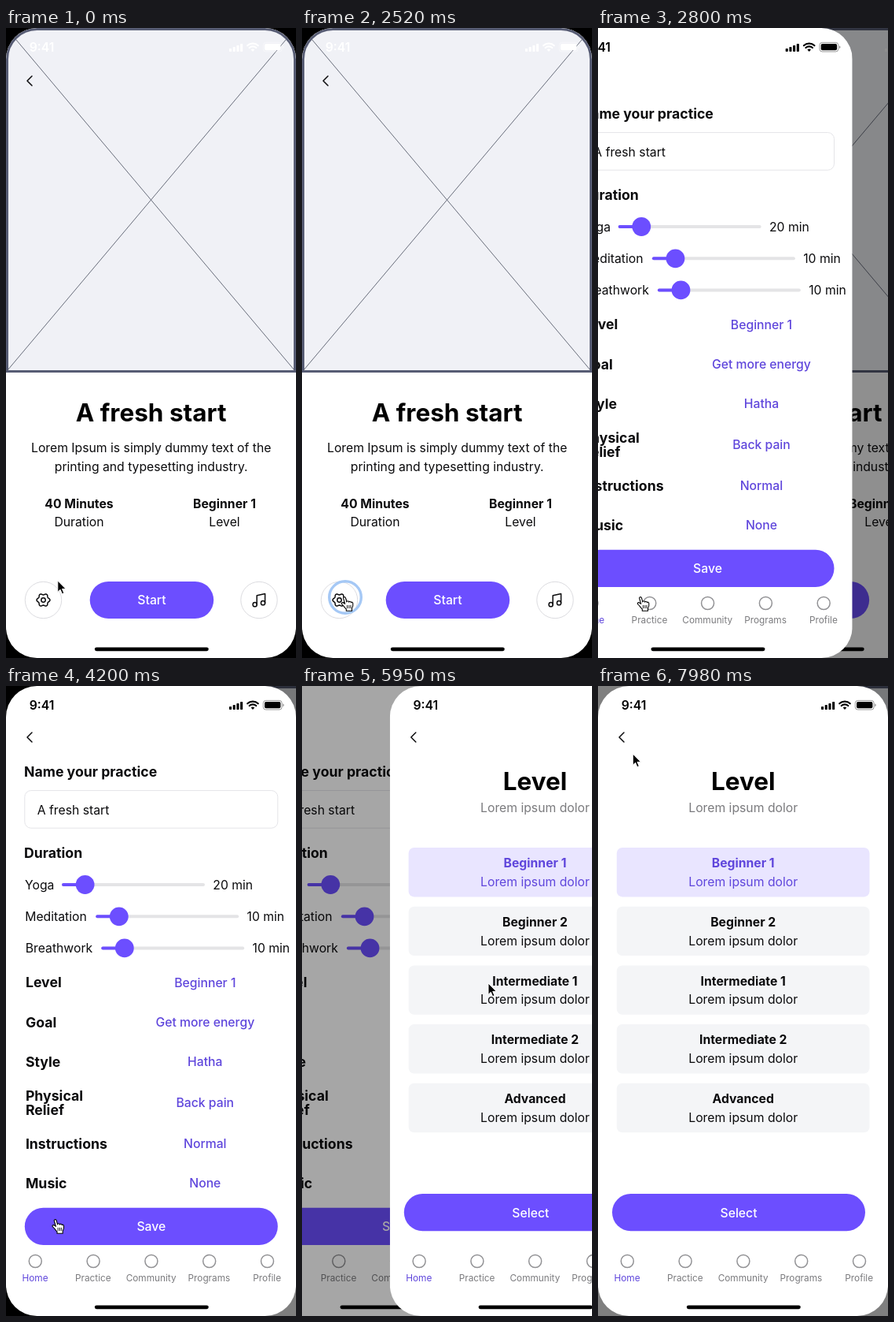
An HTML page for the animation above (8 s loop, 369 by 799 pixels).

```html
<!DOCTYPE html>
<html lang="en">
<head>
<meta charset="utf-8">
<title>Practice settings</title>
<style>
  html, body { margin: 0; width: 100%; height: 100%; overflow: hidden; background: #000; }
  svg { display: block; width: 369px; height: 799px; font-family: Inter, sans-serif; font-optical-sizing: none; }
</style>
</head>
<body>
<svg id="stage" viewBox="0 0 369 799"></svg>
<script>
const W = 369, H = 799, LOOP = 8000;
const PURPLE = '#6c4eff', VIOLET = '#5f46dc', INK = '#0b0b0d', GREY = '#7b7b7e';
const SMALL = 11.8, BODY = 15.74, HEAD = 17.7, TITLE = 31.5;

// y is the middle of the capital letters
const text = (x, y, str, { size = BODY, weight = 400, fill = INK, anchor = 'middle' } = {}) =>
  `<text x="${x}" y="${y + size * 0.364}" font-size="${size}" font-weight="${weight}" fill="${fill}" text-anchor="${anchor}">${str}</text>`;
const left = (x, y, str, style) => text(x, y, str, { ...style, anchor: 'start' });
const rect = (x, y, w, h, r, fill, extra = '') =>
  `<rect x="${x}" y="${y}" width="${w}" height="${h}" rx="${r}" fill="${fill}" ${extra}/>`;
const circle = (x, y, r, extra) => `<circle cx="${x}" cy="${y}" r="${r}" ${extra}/>`;
const stroke = (d, color = INK, width = 1.5) =>
  `<path d="${d}" fill="none" stroke="${color}" stroke-width="${width}" stroke-linecap="round" stroke-linejoin="round"/>`;
const button = (x, y, w, label) =>
  rect(x, y, w, 47.2, 23.6, PURPLE) + text(x + w / 2, y + 23.8, label, { weight: 500, fill: '#fff' });
const chevron = y => stroke(`M33 ${y - 6}l-6 6 6 6`);
const homeBar = rect(112.8, 785.4, 145, 4.8, 2.4, '#000');

function statusBar(color) {
  const bars = [4, 6, 8, 10].map((h, i) => rect(284 + i * 4.7, 30 - h, 3.1, h, 0.8, color)).join('');
  const wifi = stroke('M307.2 22.3a10 10 0 0 1 13.6 0', color, 2.1) +
    stroke('M309.7 25.1a6.2 6.2 0 0 1 8.6 0', color, 2.1) +
    `<path d="M314 30l-2.3-2.4a3.3 3.3 0 0 1 4.6 0z" fill="${color}"/>`;
  const battery = rect(327.3, 18.4, 23.8, 11.6, 3.3, 'none', `stroke="${color}" stroke-opacity=".4"`) +
    rect(329, 20.1, 20.4, 8.2, 1.8, color) +
    `<path d="M352.4 22.3q2.6 1.9 0 3.9z" fill="${color}" opacity=".5"/>`;
  return text(45.5, 24, '9:41', { weight: 600, fill: color }) + bars + wifi + battery;
}

function tabs() {
  return ['Home', 'Practice', 'Community', 'Programs', 'Profile'].map((name, i) => {
    const x = 37.3 + i * 73.8;
    return circle(x, 729.5, 8, 'fill="#fff" stroke="#929295" stroke-width="1.5"') +
      text(x - 0.3, 750.8, name, { size: SMALL, fill: i ? GREY : VIOLET });
  }).join('');
}

function gear(cx, cy) {
  const points = Array.from({ length: 72 }, (_, i) => {
    const a = i * Math.PI / 36, r = 7.5 + 0.95 * Math.cos(6 * a);
    return `${(cx + r * Math.cos(a)).toFixed(2)} ${(cy + r * Math.sin(a)).toFixed(2)}`;
  });
  return stroke(`M${points.join('L')}Z`) + circle(cx, cy, 2.7, `fill="none" stroke="${INK}" stroke-width="1.5"`);
}

function startScreen() {
  const ring = x => circle(x, 725.5, 23.2, 'fill="#fff" stroke="#dcdce0" stroke-width="1"');
  const bold = { weight: 700 };
  return '<path d="M1.5 435.5V39.4A37.9 37.9 0 0 1 39.4 1.5H329.6A37.9 37.9 0 0 1 367.5 39.4V435.5Z" fill="#f0f1f6" stroke="#575c74" stroke-width="3"/>' +
    stroke('M2 2L367 434M367 2L2 434', '#585e6c', 0.9) +
    statusBar('#fff') + chevron(67) +
    text(184.7, 487.6, 'A fresh start', { size: TITLE, weight: 700, fill: '#000' }) +
    text(184.7, 532.3, 'Lorem Ipsum is simply dummy text of the') +
    text(184.7, 556, 'printing and typesetting industry.') +
    text(93, 603, '40 Minutes', bold) + text(93, 626.7, 'Duration') +
    text(278, 603, 'Beginner 1', bold) + text(278, 626.7, 'Level') +
    ring(47.5) + gear(47.5, 725.5) + button(106.7, 701.9, 157.5, 'Start') +
    ring(322) + stroke('M319.2 731.2V719.8L329.6 717.6V729.2') +
    circle(316.7, 731.2, 2.6, `fill="none" stroke="${INK}" stroke-width="1.5"`) +
    circle(327, 729.2, 2.6, `fill="none" stroke="${INK}" stroke-width="1.5"`) + homeBar;
}

function slider(y, label, labelX, x, value) {
  return left(labelX, y, label) +
    rect(x, y - 2, 182, 4, 2, '#e4e4e6') + rect(x, y - 2, 29, 4, 2, PURPLE) +
    circle(x + 29.6, y, 11.9, `fill="${PURPLE}"`) + left(x + 192.3, y, value);
}

function settingsScreen() {
  const head = { size: HEAD, weight: 700 };
  const rows = [
    [376, 'Level', 'Beginner 1'], [426.3, 'Goal', 'Get more energy'], [476.3, 'Style', 'Hatha'],
    [528.3, '', 'Back pain'], [580.3, 'Instructions', 'Normal'], [630.6, 'Music', 'None']
  ];
  return statusBar('#000') + chevron(65) +
    left(23, 109, 'Name your practice', head) +
    rect(23.8, 132.6, 322, 47.6, 8, '#fff', 'stroke="#e4e4e8"') + left(39.7, 157, 'A fresh start') +
    left(23, 212, 'Duration', head) +
    slider(252, 'Yoga', 24, 71, '20 min') +
    slider(292.3, 'Meditation', 24.2, 114.2, '10 min') +
    slider(332.4, 'Breathwork', 24.8, 121.2, '10 min') +
    rows.map(([y, name, value]) => left(24.9, y, name, head) +
      text(253.3, y, value, { weight: 500, fill: VIOLET })).join('') +
    left(24.9, 519.7, 'Physical', head) + left(24.9, 537.4, 'Relief', head) +
    button(23.8, 661.8, 322, 'Save') + tabs() + homeBar;
}

function levelScreen() {
  const names = ['Beginner 1', 'Beginner 2', 'Intermediate 1', 'Intermediate 2', 'Advanced'];
  const lorem = 'Lorem ipsum dolor';
  return statusBar('#000') + chevron(65) +
    text(184.7, 121, 'Level', { size: TITLE, weight: 700, fill: '#000' }) +
    text(184.7, 154, lorem, { fill: GREY }) +
    names.map((name, i) => {
      const y = 205 + i * 74.7, fill = i ? INK : VIOLET;
      return rect(23.8, y, 321.7, 62.4, 7, i ? '#f4f5f7' : '#e9e5ff') +
        text(184.7, y + 19.6, name, { weight: 700, fill }) + text(184.7, y + 43.3, lorem, { fill });
    }).join('') +
    button(18, 644, 322, 'Select') + tabs() + homeBar;
}

const screen = (id, body) =>
  `<g id="${id}"><g clip-path="url(#phone)">${rect(0, 0, W, H, 0, '#fff')}${body}${rect(0, 0, W, H, 0, '#000', 'class="shade" opacity="0"')}</g></g>`;

const stage = document.getElementById('stage');
stage.innerHTML = `<clipPath id="phone">${rect(0, 0, W, H, 39.4, '#000')}</clipPath>` +
  screen('start', startScreen()) + screen('settings', settingsScreen()) + screen('level', levelScreen()) +
  circle(0, 0, 20.3, 'id="click" fill="none" stroke="#a5c8f5" stroke-width="3.4"') +
  `<g id="cursor">
    <path id="arrow" d="M0 0V14.4L3.3 11.3 5.6 16.7 8 15.6 5.7 10.4H10.3Z" fill="#000" stroke="#fff" stroke-width="1"/>
    <g id="hand" stroke="#000" stroke-width="1.1" stroke-linejoin="round" stroke-linecap="round">
      <path fill="#fff" d="M-1.6 1.5c-.5-2 2.1-2.6 2.8-.6l1.3 5c.3-1.7 2.6-1.6 2.9.2c.5-1.4 2.5-1 2.7.6c.6-1 2.3-.5 2.4 1.1c.4 3-.3 5-1.3 6.4v3h-7.2v-2.2c-2.2-2-3.4-4.6-5.8-6.4c-.8-1.8 1.2-2.6 2.8-1.2l1.4 1z"/>
      <path d="M3.2 10.3v3.4M5.5 10.3v3.4M7.7 10.3v3.4" stroke-width=".9"/>
    </g>
  </g>`;

const $ = id => document.getElementById(id);
const show = (el, on) => { el.style.display = on ? '' : 'none'; };

const SLIDES = [
  { at: 2590, from: $('start'), to: $('settings'), side: -1 },
  { at: 5810, from: $('settings'), to: $('level'), side: 1 }
];
const CLICKS = [2450, 5670];
// Each leg: start time, end time, end point
const HOME = [65.8, 701];
const MOVES = [
  [70, 420, 61, 712], [560, 1050, 54.3, 722],
  [4060, 4200, 63, 677], [4200, 5250, 237, 377],
  [6860, 7210, 215, 345], [7420, 7980, 44.3, 86]
];

// Critically damped spring
const spring = ms => {
  const x = Math.max(0, ms) * 0.0172;
  return x > 13 ? 1 : 1 - (1 + x) * Math.exp(-x);
};
const clamp = v => Math.min(1, Math.max(0, v));
const ease = v => v * v * (3 - 2 * v);

function pointerAt(t) {
  let [x, y] = HOME;
  for (const [begin, end, toX, toY] of MOVES) {
    const k = ease(clamp((t - begin) / (end - begin)));
    x += (toX - x) * k;
    y += (toY - y) * k;
  }
  return [x, y];
}

function isHand(t, x, y) {
  if (t < 2590) return Math.hypot(x - 47.5, y - 725.5) < 23.5;
  return t < 5950 && (y > 660 || y < 388);
}

function slide({ at, from, to, side }, t) {
  const p = spring(t - at);
  show(to, p > 0);
  if (p === 0) return;
  to.setAttribute('transform', `translate(${side * W * (1 - p)})`);
  from.setAttribute('transform', `translate(${-side * W * p / 4})`);
  from.querySelector('.shade').setAttribute('opacity', p / 2);
}

function draw(t) {
  for (const id of ['start', 'settings', 'level']) {
    $(id).removeAttribute('transform');
    $(id).querySelector('.shade').setAttribute('opacity', 0);
  }
  SLIDES.forEach(s => slide(s, t));

  const [x, y] = pointerAt(t), hand = isHand(t, x, y);
  $('cursor').setAttribute('transform', `translate(${x} ${y})`);
  show($('hand'), hand);
  show($('arrow'), !hand);

  const click = CLICKS.find(c => t >= c && t < c + 250);
  show($('click'), click !== undefined);
  if (click !== undefined) {
    $('click').setAttribute('transform', `translate(${x + 0.7} ${y})`);
    $('click').setAttribute('opacity', 1 - clamp((t - click - 140) / 110));
  }
}

const began = performance.now();
function tick() {
  draw((performance.now() - began) % LOOP);
  requestAnimationFrame(tick);
}
tick();
</script>
</body>
</html>
```
